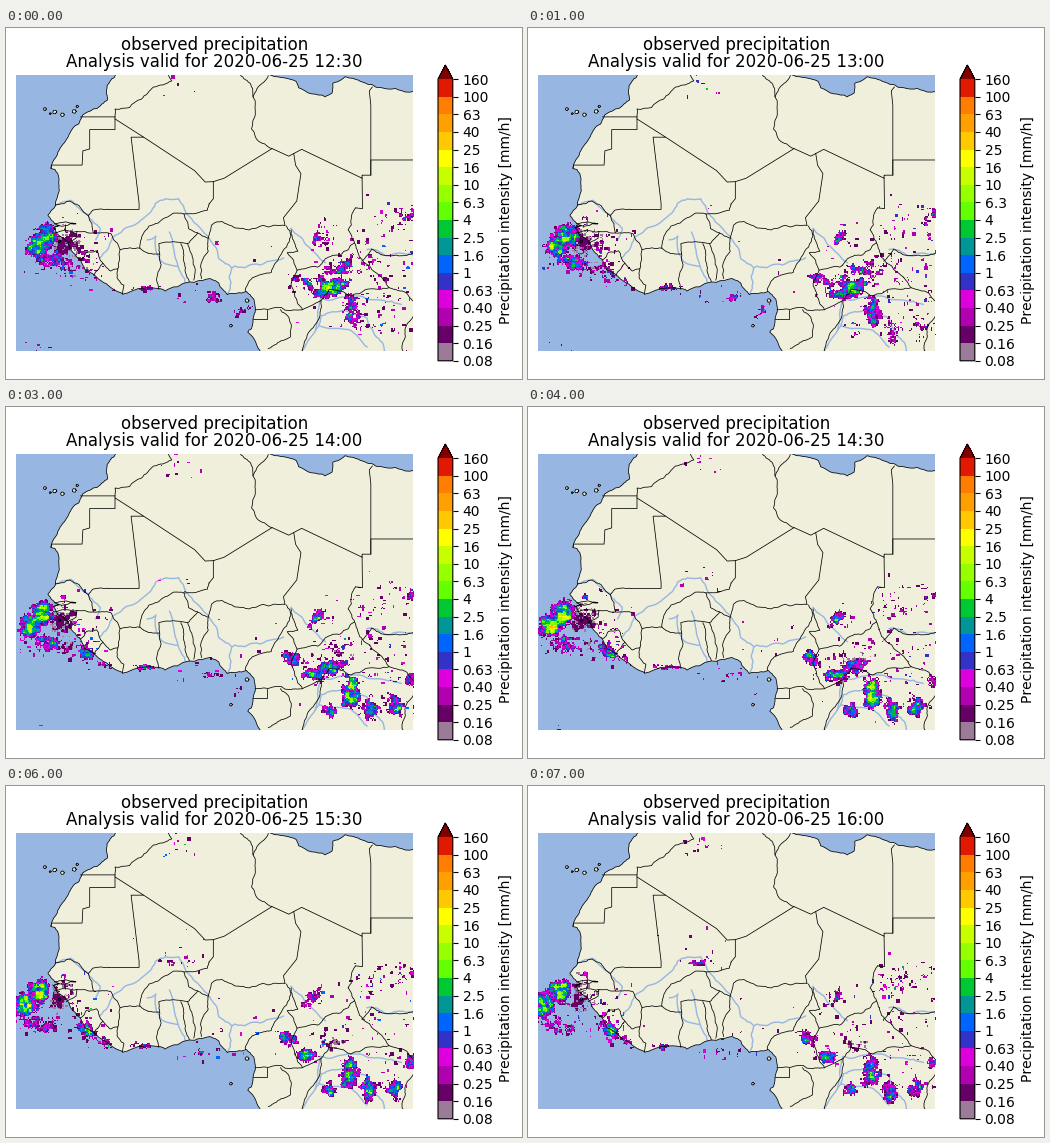
Recreate the animation shown at these times as a matplotlib script. Size 516 by 351 pixels, loop 8 s.

```python
import numpy as np
import matplotlib.pyplot as plt
from matplotlib.animation import FuncAnimation
from matplotlib.cm import ScalarMappable
from matplotlib.colors import BoundaryNorm, ListedColormap

W, H = 516, 351
LEFT, TOP, WIDE, HIGH = 10, 47, 397, 276
EXTENT = (-21.7, 30.55, -3.13, 33.18)
COLS, ROWS, STEPS = 300, 208, 8
WATER, LAND = "#97b6e1", "#efefdb"
COLORS = ["#9b7b97", "#660066", "#b000b0", "#dd00dd", "#3232c8", "#0064ff",
          "#009696", "#00c832", "#64ff00", "#96ff00", "#c8ff00", "#ffff00",
          "#ffc800", "#ffa000", "#ff7d00", "#e11900", "#800000"]
LABELS = ("0.08 0.16 0.25 0.40 0.63 1 1.6 2.5 4 6.3 "
          "10 16 25 40 63 100 160").split()

plt.rcParams.update({"font.family": "DejaVu Sans", "text.kerning_factor": 6})
fig = plt.figure(figsize=(W / 100, H / 100), dpi=100, facecolor="white")


def pixel_axes(x, y, w, h, **kw):
    return fig.add_axes([x / W, 1 - (y + h) / H, w / W, h / H], **kw)


ax = pixel_axes(LEFT, TOP, WIDE, HIGH, facecolor=WATER)
ax.set(xticks=[], yticks=[])
ax.spines[:].set_visible(False)
bend = np.random.default_rng(3)


def wander(points, rough, passes=3):
    """Roughen a path by shifting the middle of each piece sideways."""
    p = np.array(points, float)
    for _ in range(passes):
        d = np.diff(p, axis=0)
        side = np.column_stack([-d[:, 1], d[:, 0]])
        mid = p[:-1] + d / 2 + side * rough * bend.normal(size=(len(d), 1))
        out = np.empty((2 * len(p) - 1, 2))
        out[::2], out[1::2] = p, mid
        p = out
    return p


def line(*points, rough=0.06, color="black", lw=0.55, z=4):
    ax.plot(*wander(points, rough).T, color=color, lw=lw, zorder=z)


def straight(*points):
    line(*points, rough=0)


def river(*points):
    line(*points, color=WATER, lw=1, z=2)


def land(points, rough=0.05):
    p = wander(points + points[:1], rough)
    ax.fill(*p.T, fc=LAND, ec="none", zorder=1)
    ax.plot(*p.T, color="black", lw=0.55, zorder=4)


# Main land mass, closed well outside the view
land([(-8.5, 33.4), (-9.3, 32.4), (-9.8, 31), (-9.65, 29.9), (-11, 28.8),
      (-12.9, 27.95), (-13.5, 26.7), (-14.8, 25.1), (-16.2, 23), (-17.1, 20.9),
      (-16.2, 20.2), (-16, 18), (-16.5, 16), (-17.5, 14.75), (-16.6, 13.6),
      (-16, 13.4), (-16.8, 13.1), (-16.2, 12.2), (-15.2, 11.5), (-14.6, 10.4),
      (-13.2, 8.8), (-12.6, 7.5), (-10.8, 6.3), (-9.2, 5.2), (-7.6, 4.35),
      (-5.5, 5.1), (-3.1, 5.1), (-2.1, 4.75), (1.1, 5.95), (3.8, 6.4),
      (5, 5.8), (6.1, 4.3), (8.6, 4.7), (9.6, 3.7), (9.8, 2.3), (9.5, 1.1),
      (9.3, -.2), (8.8, -.65), (10.6, -3.4), (13, -8), (34, -8), (34, 31.2),
      (29.5, 30.95), (26, 31.55), (24.5, 32), (23, 32.6), (21.6, 32.95),
      (20, 32.1), (19.9, 30.8), (19, 30.3), (15.5, 31.5), (15.2, 32.3),
      (13, 32.9), (11.1, 33.4), (11, 37), (-8, 37)])

corners = np.linspace(0, 2 * np.pi, 7)[:-1]
for x, y, r in [(-17.9, 28.7, .2), (-17.2, 28.1, .12), (-16.6, 28.3, .26),
                (-15.6, 27.95, .24), (-14, 28.4, .25), (-13.65, 29.05, .16),
                (8.7, 3.5, .25), (6.6, .2, .18), (-16, 11.3, .18)]:
    land(list(zip(x + r * np.cos(corners), y + r * np.sin(corners))), 0.12)

# Desert borders
straight((-13.2, 27.67), (-8.67, 27.67), (-8.67, 26), (-12, 26), (-12, 23.45),
         (-12.9, 23.2), (-13, 21.33), (-17, 21.33), (-17.1, 20.9))
straight((-8.67, 27.4), (-4.9, 25), (-6.55, 25), (-5.5, 16.3), (-5.5, 15.5),
         (-9.5, 15.5))
straight((3.7, 16.2), (4.27, 16.9), (4.27, 19.15), (3.2, 19.1), (1.8, 20.6),
         (-4.9, 25))
straight((4.27, 19.15), (5.7, 19.6), (12, 23.5), (14.2, 22.5), (15.9, 23.4),
         (23.85, 19.6), (23.85, 20), (25, 20), (25, 22), (31, 22))
straight((25, 20), (25, 29.2), (24.8, 31.1), (25.2, 31.6))
straight((14.85, 22.86), (15.1, 21.3), (15.8, 20.2), (15.25, 16.6),
         (13.5, 14.4), (13.7, 13.4))
straight((23.85, 19.6), (23.9, 15.6), (23, 15.7))
line((-8.67, 27.67), (-8.67, 28.7), (-5.2, 30), (-3.6, 31.6), (-1.2, 32.4),
     (-1.7, 33.4))
line((12, 23.5), (10, 24.7), (9.3, 26.1), (9.8, 28), (9.5, 30.3), (9.1, 32.1),
     (7.6, 33.4))
line((9.5, 30.3), (10.1, 31.5), (11.5, 33.1))

# Western borders
line((-9.5, 15.5), (-11.6, 15.4), (-12.2, 14.7), (-13.4, 16), (-14.6, 16.6),
     (-16.5, 16.1))
line((-12.2, 14.7), (-11.5, 12.4), (-13.7, 12.6), (-16.7, 12.4))
line((-13.7, 12.6), (-13.8, 11.7), (-15.1, 11))
line((-16.6, 13.6), (-15.2, 13.85), (-13.8, 13.6), (-15.3, 13.35),
     (-16.8, 13.1))
line((-11.5, 12.4), (-9.2, 12.3), (-8, 10.2), (-8.3, 7.7), (-8.4, 6.5),
     (-7.5, 5.5), (-7.7, 4.35))
line((-8.3, 7.7), (-9.3, 7.4), (-10.25, 8.4), (-11.45, 6.8))
line((-10.25, 8.4), (-11.1, 10.05), (-12.4, 9.85), (-13.2, 8.9))
line((-8, 10.2), (-5.4, 10.4), (-5.2, 11.6), (-4.2, 13.3), (-3, 13.7),
     (-1, 15), (.4, 14.9), (3.5, 15.4), (3.7, 16.2))
line((.4, 14.9), (1, 13), (2.2, 12.4), (.9, 11), (-2.9, 11), (-2.8, 9.6),
     (-4.3, 9.7), (-5.4, 10.4))
line((-2.8, 9.6), (-2.6, 8.2), (-3.2, 6.3), (-2.9, 5))
line((0, 11), (.4, 9.5), (.6, 7.2), (1.1, 6))
line((.9, 11), (1.6, 9), (1.7, 6.2))
line((2.2, 12.4), (3.6, 11.7), (3.6, 10), (2.7, 8.5), (2.7, 6.4))
line((3.6, 11.7), (4.1, 13.5), (5.4, 13.9), (7, 13.1), (9, 12.8), (10.8, 13.4),
     (13.7, 13.4))

# Central borders
line((8.5, 4.7), (9.4, 6.5), (10.8, 7), (11.9, 7.2), (13, 9.3), (14.5, 12),
     (13.9, 13.3))
line((14.5, 12.8), (15, 11), (15.4, 10), (14, 9.8), (15.3, 7.5), (14.5, 5.5),
     (15, 4), (16, 2.3), (14.3, 2.2), (9.8, 2.3))
straight((11.3, 2.25), (11.3, 1.05), (9.5, 1.05))
line((13.1, 2.3), (14.2, 1.3), (14.4, -1.3), (12.6, -2.2), (11.5, -2.8))
line((15.3, 7.5), (18, 7.9), (19, 9), (21, 9.5), (22.85, 11.1), (22, 12.8),
     (22.4, 14.2), (23, 15.7))
line((22.85, 11.1), (23.5, 9.2), (25.1, 7.6), (27.4, 5.2), (29.7, 4.5),
     (30.8, 3.3), (31, 2))
line((23.8, 8.7), (25.1, 10.3), (26.5, 9.5), (29, 9.4), (31, 9.9))
line((31, 2), (29.8, .5), (29.5, -1.4), (29.1, -2.8), (29.3, -3.4))
line((27.4, 5.2), (24.5, 5), (22.4, 4.1), (19.5, 5), (18.45, 3.5), (16, 2.3))
line((18.45, 3.5), (17.8, .5), (16.4, -1.7), (16, -3.4))

river((-10.7, 9.1), (-9, 11.8), (-6, 13.5), (-4.1, 15), (-2, 16.9), (-.3, 16.9),
      (2.1, 13.5), (4.6, 10.5), (5, 9), (6.7, 7.8), (6.6, 5.8), (6.1, 4.3))
river((6.7, 7.8), (10, 8.3), (13.5, 9.1))
river((-16.5, 16), (-14.5, 16.7), (-12.2, 14.8), (-10.6, 13), (-11.2, 11.5))
river((14.5, 13), (16.5, 10.8), (19, 8.5))
river((.6, 5.8), (-.3, 7.8), (-1, 10.5), (-1.5, 12.5))
river((-.4, 8), (-2.5, 8.6), (-3.3, 12), (-4.4, 11.5))
river((15.6, -3.4), (17.7, -.5), (18.5, 1.5), (21.5, 2.2), (24.5, 1.2),
      (25.5, -1), (27, -3.4))
river((17.7, -.5), (18.4, 3.8), (22.4, 4.1), (25.5, 3.6), (29, 3))
river((18.2, .2), (22, -.3), (24.5, -2.6))
river((24.5, 10.2), (27, 9.4), (30.6, 9.5))

X, Y = np.meshgrid(LEFT + (np.arange(COLS) + .5) * WIDE / COLS,
                   TOP + (np.arange(ROWS) + .5) * HIGH / ROWS)


def smooth(a, times):
    for _ in range(times):
        a = sum(np.roll(a, s, d) for s, d in
                ((0, 0), (1, 0), (-1, 0), (1, 1), (-1, 1))) / 5
    return a / a.std()


def texture(seed):
    fine, broad = np.random.default_rng(seed).normal(size=(2, ROWS, COLS))
    a = smooth(fine, 1) + smooth(broad, 8)
    return a / a.std()


def cell(at, drift, size, tilt, top, when, rate=0.3, faint=False):
    """Rain cell that drifts evenly, is strongest at `when`, then fades."""
    def level(step, noise):
        dx, dy = X - at[0] - drift[0] * step / 7, Y - at[1] - drift[1] * step / 7
        c, s = np.cos(np.radians(tilt)), np.sin(np.radians(tilt))
        d2 = (((dx * c + dy * s) / size[0]) ** 2
              + ((dy * c - dx * s) / size[1]) ** 2)
        p = top - rate * (step - when) ** 2
        f = p - (abs(p) + 3) * d2 + 2 * noise
        return np.where(f > 0, np.minimum(f, 1.9) if faint else f + 1.3, -1)
    return level


def scatter(at, spread, first, last):
    """Small showers around a point, their number changing over the loop."""
    def level(step, noise):
        home = np.random.default_rng(int(at[0] + at[1]))
        now = np.random.default_rng(step)
        out = np.full(X.shape, -1.0)
        for _ in range(round(first + (last - first) * step / 7)):
            x, y = home.normal(at, spread) + now.normal(0, 1.5, 2)
            i = int((y - TOP) * ROWS / HIGH)
            j = int((x - LEFT) * COLS / WIDE)
            h, w = now.integers(1, 4, 2)
            if i >= 0 and j >= 0:
                out[i:i + h, j:j + w] = 1 + min(now.exponential(1.3), 6)
        return np.where(noise > -0.3, out, -1)
    return level


rain = [
    # western storm and its trailing edge
    cell((39, 208), (-8, -2), (16, 14), -47, 7, 4, rate=0.08),
    cell((32, 217), (-16, 2), (16, 14), -47, 7.5, 5, rate=0.08),
    cell((47, 233), (-18, 6), (22, 9), 8, 3.5, 0, rate=0.06),
    cell((60, 214), (-6, -6), (16, 18), 0, 2.5, 1, rate=0.06, faint=True),
    cell((70, 240), (-12, -3), (16, 8), 0, 1, 2, faint=True),
    cell((58, 190), (0, 0), (5, 3), 0, 3, 4),
    # coast
    cell((78, 243), (4, 1), (14, 8), 40, 5.5, 5),
    cell((92, 253), (4, 1), (14, 5), 35, 1, 7, rate=0.05),
    cell((141, 260), (-7, 0), (14, 4), 0, 1.5, 4, rate=0.05),
    cell((207, 271), (-15, -5), (9, 5), 0, 2.5, 0, rate=0.05),
    cell((236, 281), (-6, 0), (9, 5), -20, 1, 0),
    # eastern plateau and central band
    cell((312, 213), (-9, -2), (13, 8), -45, 4.5, 4),
    cell((400, 189), (-5, 2), (14, 8), -40, 1, 3, rate=0.1),
    cell((326, 259), (-3, 4), (21, 11), -28, 7, 0),
    cell((294, 254), (-16, -2), (15, 8), 30, 4.2, 4, rate=0.1),
    cell((313, 265), (-14, 5), (14, 7), -5, 5.5, 5, rate=0.1),
    cell((330, 243), (0, 8), (27, 12), -20, 1, 0),
    cell((333, 244), (-5, 16), (18, 9), -15, 1.5, 3, rate=0.1, faint=True),
    # southern basin
    cell((345, 284), (-3, 4), (12, 20), 0, 7, 4),
    cell((324, 304), (-2, 0), (9, 9), 0, 4.5, 5),
    cell((366, 300), (-5, 5), (10, 13), 0, 5, 5),
    cell((390, 299), (-4, 4), (9, 13), 0, 4.5, 5),
    cell((405, 270), (-1, 7), (8, 9), 0, 4.5, 5),
    cell((173, 177), (0, 0), (13, 4), 0, 3.5, 7, rate=1),
    # loose showers
    scatter((62, 222), (17, 16), 60, 25), scatter((80, 240), (12, 10), 14, 25),
    scatter((25, 240), (14, 4), 4, 30), scatter((32, 318), (8, 4), 6, 0),
    scatter((372, 210), (24, 20), 45, 35), scatter((360, 244), (26, 9), 45, 15),
    scatter((316, 248), (18, 10), 40, 10), scatter((360, 285), (26, 22), 70, 40),
    scatter((365, 196), (12, 7), 3, 50), scatter((205, 268), (22, 5), 14, 12),
    scatter((318, 208), (6, 10), 16, 4), scatter((230, 240), (25, 15), 4, 14),
    scatter((172, 56), (10, 6), 5, 14), scatter((165, 165), (18, 20), 1, 14),
]


def rain_map(step):
    noise = (texture(7) + texture(20 + step)) / np.sqrt(2)
    top = np.max([part(step, noise) for part in rain], axis=0)
    return np.ma.masked_less(top, 0)


fields = [rain_map(k) for k in range(STEPS)]
cmap = ListedColormap(COLORS)
img = ax.imshow(fields[0], cmap=cmap, vmin=0, vmax=len(COLORS), extent=EXTENT,
                aspect="auto", interpolation="nearest", zorder=3)
ax.set(xlim=EXTENT[:2], ylim=EXTENT[2:])
title = ax.set_title("", fontsize=12, linespacing=0.94)

levels = [float(s) for s in LABELS]
norm = BoundaryNorm(levels, len(COLORS), extend="max")
bar = fig.colorbar(ScalarMappable(norm, cmap), extend="max",
                   cax=pixel_axes(432, 37, 14.8, 295.8))
bar.set_ticks(levels, labels=LABELS)
bar.minorticks_off()
bar.set_label("Precipitation intensity [mm/h]")


def draw(step):
    minutes = 12 * 60 + 30 + 30 * step
    title.set_text("observed precipitation\nAnalysis valid for 2020-06-25 "
                   f"{minutes // 60:02d}:{minutes % 60:02d}")
    img.set_data(fields[step])
    return img, title


anim = FuncAnimation(fig, draw, frames=STEPS, interval=1000,
                     init_func=lambda: draw(0), repeat=True, repeat_delay=0)
plt.show()
```
